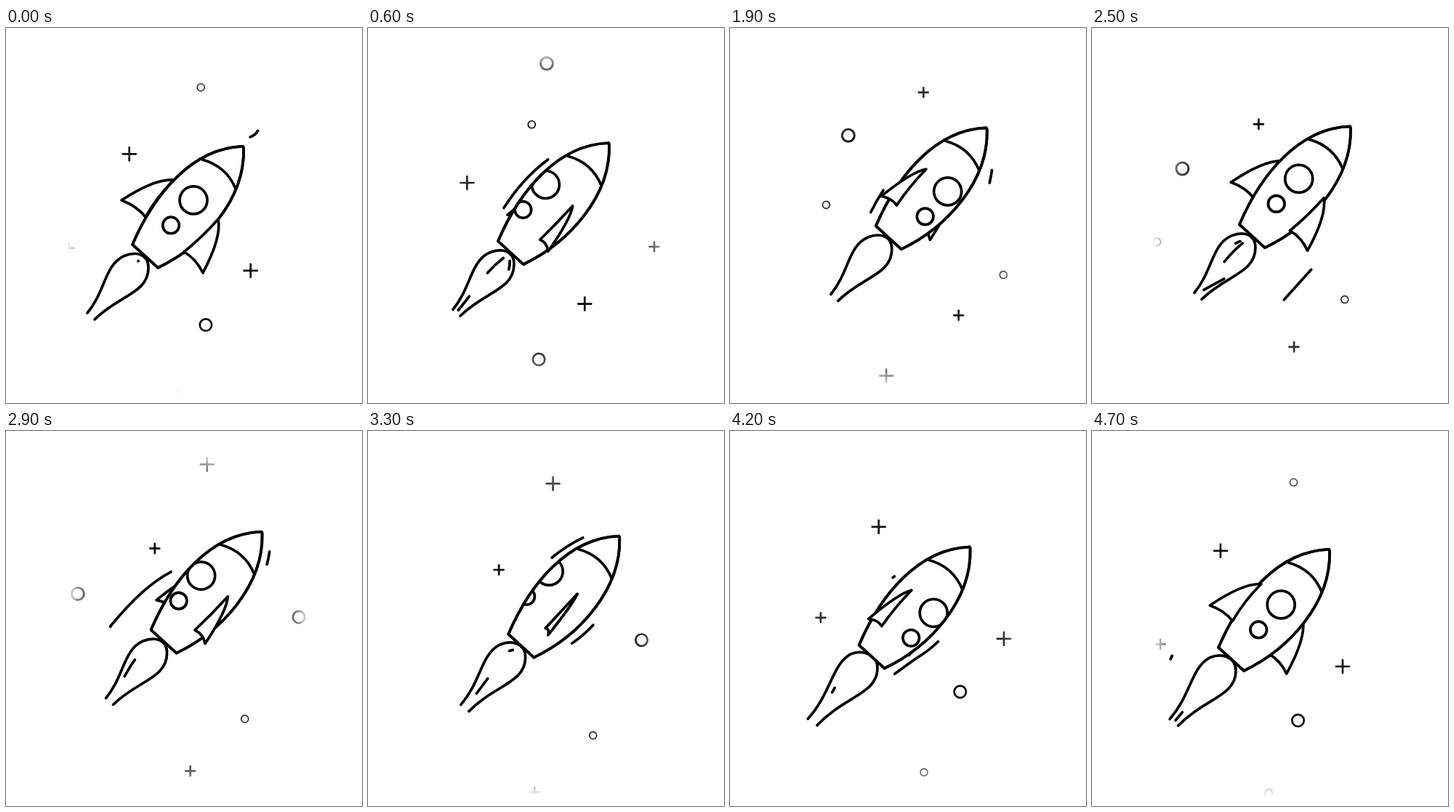
These frames come from a looping animation (490 by 516 pixels, 4.8 s). An HTML page:

```html
<!DOCTYPE html>
<html lang="en">
<head>
<meta charset="utf-8">
<title>Rocket</title>
<style>
  html, body { margin: 0; width: 100%; height: 100%; overflow: hidden; background: #fff; }
  svg { display: block; width: 490px; height: 516px; }
  path, circle { fill: none; stroke: #000; stroke-linecap: round; stroke-linejoin: round; }
  #rocket { stroke-width: 3.7; }
  #rocket .solid { fill: #fff; }
</style>
</head>
<body>
<svg viewBox="0 0 490 516">
  <defs>
    <radialGradient id="fade" gradientUnits="userSpaceOnUse" cx="0" cy="0" r="1"
      gradientTransform="translate(250 264) scale(167 238)">
      <stop offset=".57" stop-color="#fff"/>
      <stop offset=".75" stop-color="#fff" stop-opacity=".82"/>
      <stop offset=".9" stop-color="#fff" stop-opacity=".52"/>
      <stop offset="1" stop-color="#fff" stop-opacity=".05"/>
      <stop offset="1" stop-color="#fff" stop-opacity="0"/>
    </radialGradient>
    <mask id="sky" maskUnits="userSpaceOnUse" x="0" y="0" width="490" height="516">
      <rect x="84" y="26" width="331" height="476" fill="url(#fade)"/>
    </mask>
    <clipPath id="inside"><path id="hullClip"/></clipPath>
  </defs>
  <g mask="url(#sky)"><g id="stars"></g></g>
  <g id="rocket">
    <path id="flame" class="solid"/>
    <g id="streaks"></g>
    <path id="backFin" class="solid"/>
    <path id="hull" class="solid"/>
    <g clip-path="url(#inside)"><g id="windows"></g></g>
    <path id="hullLine"/>
    <path d="M270 181Q303 190 316 221"/>
    <path id="frontFin" class="solid"/>
  </g>
</svg>
<script>
const LOOP = 4800, STEP = 100, SPIN = 2400;
const $ = id => document.getElementById(id);

function add(parent, tag, attrs) {
  const el = document.createElementNS('http://www.w3.org/2000/svg', tag);
  for (const k in attrs) el.setAttribute(k, attrs[k]);
  return parent.appendChild(el);
}

const HULL = 'M325 163Q327 162.500 327 166C329 236 272 300 209 330L174 298C204 228 256 166 325 163Z';
for (const id of ['hullClip', 'hull', 'hullLine']) $(id).setAttribute('d', HULL);

// Two sets of windows, one turn apart, slide across the hull.
for (const shift of [0, 1]) {
  const g = add($('windows'), 'g', { transform: `translate(${74.3 * shift} ${67 * shift})` });
  add(g, 'circle', { cx: 258, cy: 237, r: 19 });
  add(g, 'circle', { cx: 227, cy: 271.5, r: 11.3 });
}

// kind, half size, line width, entry time, x, y, speed in px per 100 ms
const stars = [
  ['o', 5, 1.7, 4100, 320.4, 19.6, 7.15],
  ['+', 9, 2.7, 2500, 299, 19.5, 5.55],
  ['+', 9, 2.7, 3500, 421.8, 232.6, 6.4],
  ['o', 8.2, 2.7, 2600, 423, 232.4, 6.64],
  ['o', 8.5, 3, 200, 271.6, 18.4, 6.4],
  ['+', 6.5, 2.7, 100, 424.5, 264.7, 6.1],
  ['+', 6.5, 2.7, 950, 324.7, 19, 6.15],
  ['o', 5, 1.7, 800, 428.5, 277.5, 4.75]
].map(([kind, r, w, start, x, y, v]) => ({
  start, x, y, v,
  el: kind === 'o'
    ? add($('stars'), 'circle', { r, 'stroke-width': w })
    : add($('stars'), 'path', { d: `M${-r} 0H${r}M0 ${-r}V${r}`, 'stroke-width': w })
}));

const NOSE = 'M347 141Q343 148 336 150';
const paths = {
  left: NOSE + 'C262 154 200 212 167 279',
  leftWide: NOSE + 'C270 160 238 195 202 218C175 232 150 255 119 292L108 314',
  right: 'M338 151C346 235 290 295 253 316L199 355L184 367',
  rightWide: 'M338 151C342 240 310 320 272 361L235 402',
  fireLeft: 'M185 319C160 322 150 340 137 363',
  fireMid: 'M183 320C150 345 140 372 106 408',
  fireRight: 'M190 322C193 357 160 368 125 388'
};

// path, start, speed in px per ms, tail ratio, tail lag
const streaks = [
  ['left', 4755, .32, .6, 8],
  ['left', 1010, .32, .71, 0],
  ['left', 2903, .32, .6, 0],
  ['leftWide', 2505, .71, .61, 4],
  ['leftWide', 3750, .32, .98, 0],
  ['right', 605, .32, .74, 0],
  ['right', 2720, .32, .84, 9],
  ['right', 3683, .45, .7, 5],
  ['rightWide', 1625, .32, .8, 0],
  ['fireLeft', 904, .125, .56, 0],
  ['fireLeft', 2364, .125, .6, 0],
  ['fireLeft', 3220, .125, .5, 0],
  ['fireMid', 4792, .16, .75, 0],
  ['fireMid', 349, .1275, 1, 30],
  ['fireMid', 2407, .45, 1, 36],
  ['fireMid', 2900, .2, .68, 0],
  ['fireMid', 4492, .5, .86, 0],
  ['fireRight', 540, .25, 1, 12],
  ['fireRight', 2200, .34, .66, 0]
].map(([name, start, speed, ratio, lag]) => {
  const el = add($('streaks'), 'path', { d: paths[name] });
  return { el, start, speed, ratio, lag, length: el.getTotalLength() };
});

// Fin points: outer edge, tip, lower edge, root; right side, then left side.
const FIN_RIGHT = [292, 263, 297, 288, 271, 337, 262, 318, 245, 308, 271, 287];
const FIN_LEFT = [231, 209, 205, 207, 159, 237, 180, 245, 192, 260, 207, 233];

function fin(q) {
  const p = FIN_RIGHT.map((a, i) => (a + (FIN_LEFT[i] - a) * q).toFixed(2));
  const at = i => p[2 * i] + ' ' + p[2 * i + 1];
  return `M${at(0)}Q${at(1)} ${at(2)}Q${at(3)} ${at(4)}Q${at(5)} ${at(0)}Z`;
}

// The bulb swells a little as the tail stretches.
function flame(e) {
  const side = 196 + e * .4, top = 313.5 - e * .4;
  return `M${112 - e} ${392 + e * .9}C137 362 136 325 163 ${top}C178 ${top - 6} ${side} 310 ${side} 330` +
    `C${side} 365 155 368 ${122 - e * .7} ${401 + e * .9}`;
}

function ramp(t, points) {
  for (let i = 1; i < points.length; i++) {
    const [t0, a] = points[i - 1], [t1, b] = points[i];
    if (t <= t1) return a + (b - a) * (t - t0) / (t1 - t0);
  }
  return 0;
}

function draw(t) {
  const lift = (1 - Math.cos(2 * Math.PI * (t + STEP / 2) / LOOP)) / 2;
  $('rocket').setAttribute('transform', `translate(${29.2 * lift} ${-27.9 * lift})`);

  // The turn slows a little each time the fins are fully out.
  const p = t % SPIN / SPIN;
  const turn = p - .025 * Math.sin(4 * Math.PI * p) * Math.cos(Math.PI * p) ** 2;
  $('windows').setAttribute('transform', `translate(${-74.3 * turn} ${-67 * turn})`);
  $('frontFin').setAttribute('d', fin(turn));
  $('backFin').setAttribute('d', fin(1 - turn));

  const stretch = ramp(t, [[0, 0], [3000, 0], [3700, 8], [4100, 9], [4700, 5], [4800, 0]]);
  $('flame').setAttribute('d', flame(stretch));

  for (const s of stars) {
    const age = (t < s.start ? t + LOOP + 30 - s.start : t - s.start) / 100;
    s.el.setAttribute('transform', `translate(${s.x - s.v * age} ${s.y + 1.19 * s.v * age})`);
  }

  for (const s of streaks) {
    const head = (t - s.start + LOOP) % LOOP * s.speed;
    const tail = Math.max(0, head * s.ratio - s.lag);
    const shown = head > 0 && tail < s.length;
    s.el.style.display = shown ? '' : 'none';
    if (!shown) continue;
    s.el.setAttribute('stroke-dasharray', `${Math.min(head, s.length) - tail} 9999`);
    s.el.setAttribute('stroke-dashoffset', -tail);
  }
}

const begin = performance.now();
function tick() {
  const t = (performance.now() - begin) % LOOP;
  draw(Math.floor(t / STEP) * STEP);
  requestAnimationFrame(tick);
}
tick();
</script>
</body>
</html>
```
